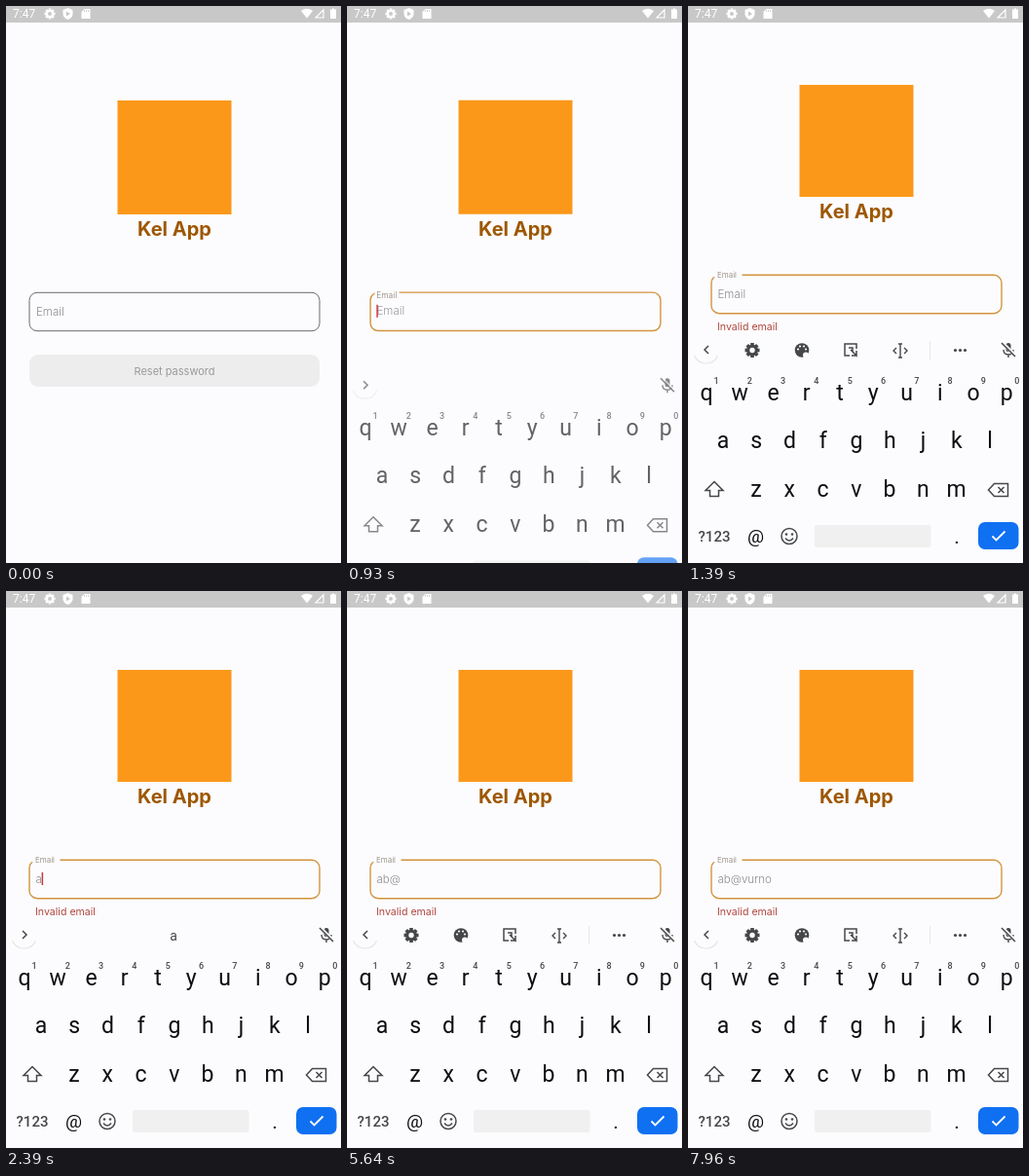
An HTML page with a canvas for the animation above (8 s loop, 344 px wide and 572 px high).

```html
<!DOCTYPE html>
<html lang="en">
<head>
<meta charset="utf-8">
<title>Password reset</title>
<style>
html, body { margin: 0; width: 100%; height: 100%; overflow: hidden; background: #fcfcfe; }
canvas { display: block; width: 344px; height: 572px; }
</style>
</head>
<body>
<canvas id="stage"></canvas>
<script>
const W = 344, H = 572, LOOP = 8000;
const PAGE = '#fcfcfe', DARK = '#0e0e10', GRAY = '#454748', HINT = '#8b8b8b', FAINT = '#e6e6e6';
const APP = 'Inter, sans-serif', KEYS = 'Roboto, sans-serif';
const FOCUS = 790, IME = 917, BLINK = 500;
const canvas = document.getElementById('stage');
const ctx = canvas.getContext('2d');
const dpr = window.devicePixelRatio || 1;
canvas.width = W * dpr;
canvas.height = H * dpr;

// Each edit also restarts the caret blink
const edits = [[860, ''], [2060, 'a'], [2480, 'ab'], [4110, 'ab@'], [5840, 'ab@v'],
  [6370, 'ab@vu'], [6700, 'ab@vur'], [7100, 'ab@vurn'], [7430, 'ab@vurno']];
const presses = [[1960, 2100, 'a', 36, 446], [2430, 2560, 'b', 207, 496], [3930, 4150, '@', 70, 545]];

const clamp = v => Math.max(0, Math.min(1, v));
const ease = (t, from, to, power = 3) => 1 - (1 - clamp((t - from) / (to - from))) ** power;
const mix = (a, b, k) => a + (b - a) * k;

function text(str, x, y, size, color, { weight = 400, align = 'left', family = APP } = {}) {
  ctx.font = `${weight} ${size}px ${family}`;
  ctx.textAlign = align;
  ctx.fillStyle = color;
  ctx.fillText(str, x, y);
}

function box(x, y, w, h, r, fill, stroke, line = 1) {
  ctx.beginPath();
  ctx.roundRect(x, y, w, h, r);
  if (fill) { ctx.fillStyle = fill; ctx.fill(); }
  if (stroke) { ctx.strokeStyle = stroke; ctx.lineWidth = line; ctx.stroke(); }
}

function disc(x, y, r, color) {
  ctx.beginPath();
  ctx.arc(x, y, r, 0, Math.PI * 2);
  ctx.fillStyle = color;
  ctx.fill();
}

function lines(d, x, y, color, width = 1.6, fill) {
  const path = new Path2D(d);
  ctx.save();
  ctx.translate(x, y);
  if (fill) { ctx.fillStyle = fill; ctx.fill(path); }
  if (color) { ctx.strokeStyle = color; ctx.lineWidth = width; ctx.stroke(path); }
  ctx.restore();
}

function gear(x, y, r, color, hole) {
  for (let i = 0; i < 4; i++) {
    ctx.save();
    ctx.translate(x, y);
    ctx.rotate(i * Math.PI / 4);
    ctx.fillStyle = color;
    ctx.fillRect(-r, -r * .24, r * 2, r * .48);
    ctx.restore();
  }
  disc(x, y, r * .78, color);
  disc(x, y, r * .36, hole);
}

function statusBar() {
  const bar = '#c8c8c8';
  ctx.fillStyle = bar;
  ctx.fillRect(0, 0, W, 17);
  text('7:47', 7, 12, 12, '#fff', { family: KEYS });
  gear(45, 8, 5.5, '#fff', bar);
  lines('M0 -6L5 -4V0Q5 4 0 6Q-5 4 -5 0V-4Z', 63.5, 8, null, 0, '#fff');
  lines('M-1.5 -2.5L2.5 0L-1.5 2.5Z', 63.5, 8, null, 0, bar);
  lines('M-1.5 -5H4.5V5H-4.5V-2Z', 82, 8, null, 0, '#fff');
  lines('M-1.5 -4V-2M.5 -4V-2M2.5 -4V-2', 82, 8, bar, .8);
  lines('M0 5L-6 -2.5Q0 -7 6 -2.5Z', 309, 7.5, null, 0, '#fff');
  lines('M-4 4H4V-4Z', 322, 8, '#fff', 1.2);
  lines('M-1 -5.5H1V-4.5H3V5H-3V-4.5H-1Z', 336, 8, null, 0, '#fff');
}

function form(t, edit) {
  const dy = -18 * ease(t, 930, 1200);
  const focused = t >= FOCUS;
  const lift = ease(t, FOCUS, FOCUS + 290);
  const top = 294 + dy;

  ctx.save();
  ctx.beginPath();
  ctx.rect(0, 81, W, H);
  ctx.clip();
  box(114.5, 97 + dy, 117, 117, 0, '#fb981a');
  ctx.restore();
  text('Kel App', 173, 236 + dy, 20, '#9d5700', { weight: 700, align: 'center' });

  box(24, top + .3, 298, 39.4, 8, null, focused ? '#d3943f' : '#6a6a6a', focused ? 1.4 : 1);
  if (focused) {
    const half = 14.5 * lift;
    ctx.fillStyle = PAGE;
    ctx.fillRect(41 - half, top - 1.5, half * 2, 4);
  }
  text('Email', mix(31, 30, lift), mix(317.5, 297, lift) + dy, mix(11.5, 8, lift),
    focused ? '#85776a' : HINT, { weight: 300 });

  const [since, value] = edit;
  ctx.globalAlpha = lift;
  text(value || 'Email', 30.5, 317.5 + dy, 11.5, HINT, { weight: 300 });
  ctx.globalAlpha = 1;

  if (t >= since && Math.floor((t - since) / BLINK) % 2 === 0) {
    ctx.font = `300 11.5px ${APP}`;
    ctx.fillStyle = '#cc3640';
    ctx.fillRect(30.3 + ctx.measureText(value).width, 307 + dy, 1.5, 13);
  }
  if (t >= 1150) text('Invalid email', 30, 333, 10.6, '#b0463e');
  if (t < 860) {
    box(24, 358, 298, 33, 9, '#ededed');
    text('Reset password', 173, 378.5, 11, '#999', { align: 'center' });
  }
}

function toolbar(t, value) {
  const tools = t >= 1250 && t < 2060 || t >= 4250;
  lines('M-12 5A13 13 0 0 0 12 5', 18.5, 354, FAINT, 1.2);
  lines(tools ? 'M2 -4L-2 0L2 4' : 'M-2 -4L2 0L-2 4', 19, 353, GRAY, 1.5);
  if (tools) {
    gear(66, 353.5, 7.5, GRAY, PAGE);
    disc(117, 353.5, 7.3, GRAY);
    for (const [x, y] of [[-4, -1], [-2, -4], [2, -4], [4, -1]]) disc(117 + x, 353.5 + y, 1.1, PAGE);
    disc(121, 358.5, 3, PAGE);
    lines('M6 -1V-6H-6V6H-1M-2 -2H2V2M0 0L6 6V1M6 6H1', 167, 353, GRAY, 1.5);
    lines('M0 -7V7M-2 -7H2M-2 7H2M-4 -3L-7 0L-4 3M4 -3L7 0L4 3', 218, 354, GRAY, 1.4);
    ctx.fillStyle = FAINT;
    ctx.fillRect(248, 344, 1, 19);
    for (const x of [274.5, 279.5, 284.5]) disc(x, 353.5, 1.6, GRAY);
  } else if (value) {
    text(value.slice(0, 2), 172, 358.5, 14, GRAY, { align: 'center', family: KEYS });
  }
  box(326.5, 346, 5, 9, 2.5, GRAY);
  lines('M-5 0Q-5 5 0 5Q5 5 5 0M0 5V8', 329, 353, GRAY, 1.4);
  lines('M-6 -7L8 7', 329, 353, PAGE, 3.2);
  lines('M-7 -7L7 7', 329, 353, GRAY, 1.5);
}

function row(letters, x, y) {
  [...letters].forEach((c, i) =>
    text(c, x + i * 34.25, y, 23, DARK, { align: 'center', family: KEYS }));
}

function popup(key, x, y) {
  box(x - 16.5, y - 75, 33, 95, 6, PAGE);
  lines('M-16.5 -74V14Q-16.5 20 -10 20H10Q16.5 20 16.5 14', x, y, FAINT, 1);
  text(key, x, y - 44, 25, DARK, { align: 'center', family: KEYS });
  if (key === '@') text('…', x + 10, y - 37, 10, DARK, { align: 'center', family: KEYS });
}

function keyboard(t, value) {
  if (t < 860) return;
  ctx.fillStyle = PAGE;
  ctx.fillRect(0, 341, W, H - 341);
  if (t < IME) return;
  ctx.save();
  ctx.translate(0, 46 * (1 - ease(t, IME, IME + 300, 5)));
  ctx.globalAlpha = mix(.62, 1, clamp((t - IME) / 250));
  toolbar(t, value);

  row('qwertyuiop', 19, 404.5);
  row('asdfghjkl', 36, 454);
  row('zxcvbnm', 70, 503.5);
  [...'1234567890'].forEach((n, i) =>
    text(n, 29 + i * 34.3, 387.5, 9, GRAY, { align: 'center', family: KEYS, weight: 500 }));

  lines('M0 -8L9 1H4.5V7H-4.5V1H-9Z', 27, 496.5, GRAY, 1.5);
  lines('M-4 -6.5H10V6.5H-4L-10 0Z', 318.5, 497, GRAY, 1.5);
  lines('M0 -3L6 3M6 -3L0 3', 318.5, 497, GRAY, 1.5);

  text('?123', 27, 550, 15, GRAY, { align: 'center', family: KEYS, weight: 500 });
  text('@', 69.5, 551, 19, DARK, { align: 'center', family: KEYS });
  lines('M8 0A8 8 0 1 1 -8 0A8 8 0 1 1 8 0M-4 2Q0 7 4 2', 104, 544.5, GRAY, 1.5);
  disc(101, 542.5, 1.3, GRAY);
  disc(107, 542.5, 1.3, GRAY);
  box(130, 533, 119.5, 23, 2, '#f0f0f0');
  text('.', 276, 552, 21, DARK, { align: 'center', family: KEYS });
  box(298, 530, 41.5, 28, 7, '#1070f2');
  lines('M-6 0L-2 4L7 -5', 318.5, 544.5, '#fff', 1.8);

  for (const [from, to, key, x, y] of presses) {
    if (t >= from && t < to) popup(key, x, y);
  }
  ctx.restore();
}

function draw(t) {
  const edit = edits.filter(([at]) => at <= t).pop() || edits[0];
  ctx.setTransform(dpr, 0, 0, dpr, 0, 0);
  ctx.globalAlpha = 1;
  ctx.fillStyle = PAGE;
  ctx.fillRect(0, 0, W, H);
  form(t, edit);
  keyboard(t, edit[1]);
  statusBar();
}

const start = performance.now();
function tick() {
  draw((performance.now() - start) % LOOP);
  requestAnimationFrame(tick);
}
tick();
</script>
</body>
</html>
```
